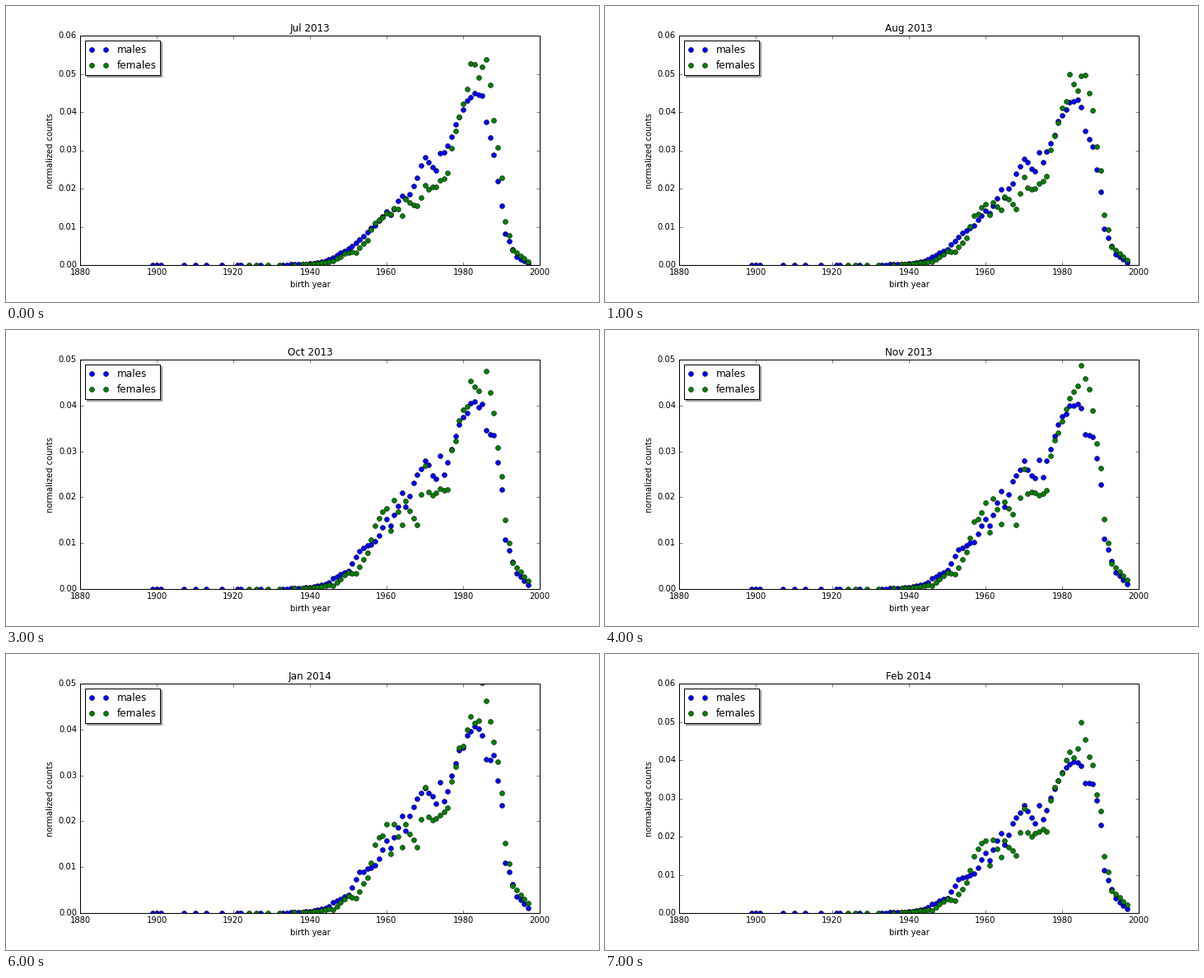
Animation of 720x360 px, one loop 8000 ms. Source, as a matplotlib script:

```python
import numpy as np
import matplotlib.pyplot as plt
from matplotlib.animation import FuncAnimation

plt.style.use("classic")
plt.rcParams.update({"font.size": 10, "font.family": "DejaVu Sans"})

MONTHS = ["Jul 2013", "Aug 2013", "Sep 2013", "Oct 2013",
          "Nov 2013", "Dec 2013", "Jan 2014", "Feb 2014"]
FIRST, LAST = 1946, 1997
UNIT = 1e-4

# Turning points of each curve: birth year, count at first, count it settles to.
MALE_CURVE = [
    (1946, 20, 23), (1950, 42, 40), (1953, 66, 89), (1957, 104, 103),
    (1960, 138, 155), (1961, 130, 140), (1964, 184, 214), (1965, 172, 182),
    (1967, 204, 235), (1970, 282, 276), (1973, 246, 238), (1974, 295, 283),
    (1975, 292, 241), (1979, 385, 349), (1981, 436, 377), (1983, 455, 398),
    (1985, 440, 383), (1986, 370, 336), (1988, 290, 344), (1990, 155, 238),
    (1991, 82, 114), (1994, 22, 38), (1997, 5, 11)]
FEMALE_CURVE = [
    (1946, 10, 7), (1950, 34, 37), (1952, 34, 32), (1955, 66, 80),
    (1957, 110, 149), (1960, 139, 191), (1961, 128, 124), (1962, 148, 199),
    (1964, 134, 147), (1965, 170, 191), (1968, 152, 144), (1970, 214, 275),
    (1971, 203, 207), (1973, 208, 201), (1976, 236, 221), (1977, 315, 287),
    (1980, 415, 374), (1982, 540, 413), (1984, 500, 414), (1985, 520, 495),
    (1986, 521, 457), (1988, 395, 381), (1990, 220, 265), (1991, 115, 154),
    (1993, 40, 60), (1997, 8, 21)]
MALE_EARLY = [1899, 1900, 1901, 1907, 1910, 1913, 1917, 1921, 1922, 1927,
              *range(1933, FIRST)]
FEMALE_EARLY = [1924, 1926, 1929, 1932, 1936, *range(1938, FIRST)]


def points(month, curve, early, level, scatter, seed):
    """Slow exponential rise, then the eased curve with a little scatter."""
    knots, start, end = np.array(curve).T
    settled = 1 - np.exp(-month / 2)
    years = np.arange(FIRST, LAST + 1)
    counts = np.interp(years, knots, start + (end - start) * settled)
    rng = np.random.default_rng(seed + month)
    counts *= 1 + scatter * rng.uniform(-1, 1, len(years))
    rise = level * np.exp((np.array(early) - 1945) / 4)
    return np.append(early, years), np.append(rise, counts) * UNIT


fig = plt.figure(figsize=(10, 5), dpi=72, facecolor="white")
fig.subplots_adjust(left=0.125, right=0.9, bottom=0.125, top=0.9)
ax = fig.add_subplot()
dots = dict(marker="o", linestyle="none", markersize=6,
            markeredgecolor="black", markeredgewidth=0.5)
male_dots, = ax.plot([], [], color="#0000ff", label="males", **dots)
female_dots, = ax.plot([], [], color="#008000", label="females", **dots)
ax.set_xlim(1880, 2000)
ax.set_xticks(range(1880, 2001, 20))
ax.yaxis.set_major_formatter("{x:.2f}")
ax.set_xlabel("birth year")
ax.set_ylabel("normalized counts")
title = ax.set_title("")
ax.legend(loc="upper left", shadow=True, numpoints=2, fontsize=12)


def draw(month):
    male_dots.set_data(*points(month, MALE_CURVE, MALE_EARLY, 14, 0.02, 10))
    female_dots.set_data(*points(month, FEMALE_CURVE, FEMALE_EARLY, 9, 0.04, 50))
    top = 0.05 if 3 <= month <= 6 else 0.06
    ax.set_ylim(0, top)
    ax.set_yticks(np.arange(0, top + 0.001, 0.01))
    title.set_text(MONTHS[month])
    return male_dots, female_dots, title


anim = FuncAnimation(fig, draw, frames=len(MONTHS), interval=1000,
                     repeat=True, repeat_delay=0, blit=False)
plt.show()
```
